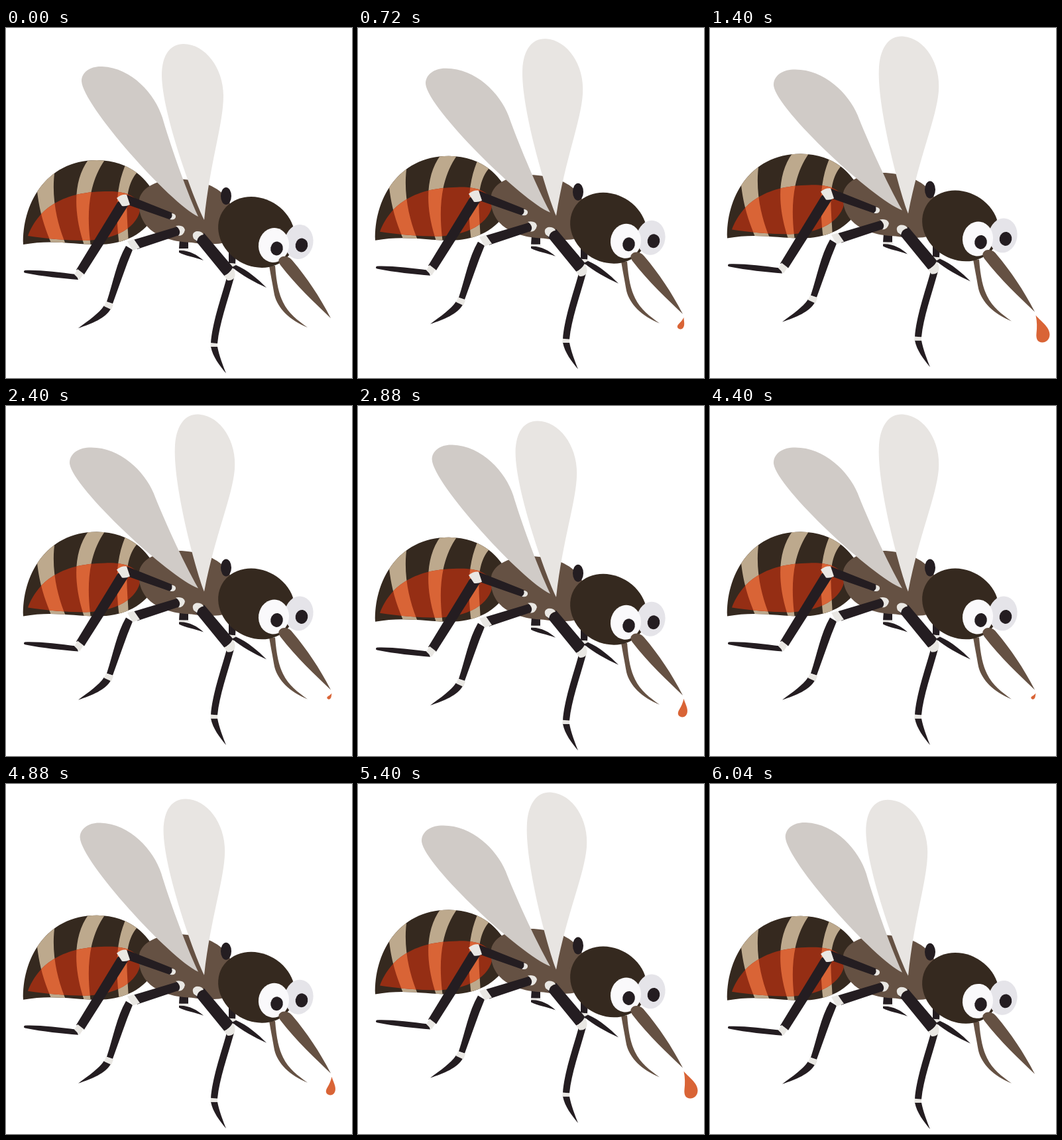
Recreate the animation shown at these times as an HTML page with a canvas. Size 522x527 px, loop 6080 ms.

```html
<!DOCTYPE html>
<html lang="en">
<head>
<meta charset="utf-8">
<title>Mosquito</title>
<style>
html, body { margin: 0; width: 100%; height: 100%; overflow: hidden; background: #fff; }
canvas { display: block; }
</style>
</head>
<body>
<canvas id="stage" width="522" height="527"></canvas>
<script>
const ctx = document.getElementById('stage').getContext('2d');
const LOOP = 6080, STEP = 40, BOB = 1000, DRIP = 2000;
const INK = '#241d21', JOINT = '#e9e7e3', BROWN = '#655143', DARK = '#35291f';
const TAN = '#bda98d', BLOOD = '#952e14', ORANGE = '#d96436';

const shape = d => new Path2D(d + 'Z');
const parts = list => list.map(([color, d]) => [color, shape(d)]);

const belly = shape('M26 326C24 268 58 199 137 199C190 199 215 232 224 250L222 285C205 315 170 326 140 326C100 326 70 318 26 326');
const blood = shape('M33 313C48 275 80 247 150 246C175 245 198 250 203 270C200 300 165 319 120 320C90 320 60 317 33 313');
const stripes = shape('M46 235C49 275 59 303 70 328L91 328C75 290 68 250 74 212');
stripes.addPath(shape('M126 196C103 225 99 272 119 330L128 330C122 285 122 235 151 196'));
stripes.addPath(shape('M183 200C167 233 164 270 171 328L185 328C184 285 174 240 201 214'));
const thorax = shape('M201 258C205 238 235 225 270 228C307 231 329 246 338 264L340 320C325 327 300 326 280 323C240 322 196 305 201 258');
const frontWing = shape('M299 289C282 255 236 130 235 72C235 40 248 24 268 24C300 24 328 60 328 102C328 145 308 200 299 289');
const backWing = shape('M290 284C248 264 116 117 114 80C114 66 128 57 145 58C190 60 225 100 236 135C246 170 270 240 290 284');
const drop = shape('M0 0C6 8 21 17 21 29C21 37 15 41 10 41C3 41 0 36 1 27C2 18 2 10 0 0');
const palp = shape('M397 358L406 358C408 385 412 401 418 413C426 430 440 440 455 451C428 440 410 422 405 402C402 385 400 375 397 358');
const proboscis = shape('M412 348C416 341 427 343 432 350C454 376 473 404 490 437C467 415 438 388 414 357C411 352 411 350 412 348');

const hindLegs = parts([
  [INK, 'M262 318L275 322L275 332L261 332'],
  [JOINT, 'M261 332L276 333L277 335L261 335'],
  [INK, 'M261 335C275 334 288 341 298 350C285 345 270 343 261 338'],
  [INK, 'M336 318L347 338L346 355L336 354'],
  [JOINT, 'M336 354L348 355L346 360L336 357'],
  [INK, 'M347 357C365 365 380 378 393 391C375 383 355 372 341 360']
]);
const legs = parts([
  [INK, 'M182 251L250 278Q256 284 249 289L186 267'],
  [JOINT, 'M250 279Q257 280 256 285Q254 290 247 288Q252 285 250 279'],
  [INK, 'M169 261L185 266L118 371L106 364'],
  [JOINT, 'M167 256Q174 250 182 251L187 266Q181 269 175 268'],
  [INK, 'M106 371C80 368 50 364 28 365Q25 368 30 369C55 374 85 377 109 379'],
  [JOINT, 'M103 371L108 363L117 370L111 379'],

  [INK, 'M192 319L259 299L264 311L198 333'],
  [JOINT, 'M256 298Q268 296 270 304Q268 313 260 313Q266 305 256 298'],
  [INK, 'M181 328L191 334C180 360 171 388 161 415L152 412C162 382 167 352 181 328'],
  [JOINT, 'M183 321L193 318L202 331L191 335'],
  [INK, 'M148 418L158 423C150 437 130 445 109 452C125 440 140 430 148 418'],
  [JOINT, 'M151 412L162 416L159 424L148 419'],

  [INK, 'M285 319L299 309L344 362L330 374'],
  [JOINT, 'M283 317Q279 308 288 306Q296 306 298 311Q290 312 288 321'],
  [INK, 'M333 376L344 376C334 412 322 445 319 475L309 475C311 445 324 408 333 376'],
  [JOINT, 'M329 373Q337 370 342 361Q347 368 345 375Q342 381 334 380'],
  [INK, 'M309 480L319 480C322 495 327 507 332 520C322 508 312 495 309 480'],
  [JOINT, 'M309 474L319 475L319 480L308 480']
]);

function fill(color, path) {
  ctx.fillStyle = color;
  ctx.fill(path);
}

function oval(color, x, y, rx, ry, deg = 0) {
  ctx.fillStyle = color;
  ctx.beginPath();
  ctx.ellipse(x, y, rx, ry, deg * Math.PI / 180, 0, Math.PI * 2);
  ctx.fill();
}

function turned(path, color, x, y, deg) {
  ctx.save();
  ctx.translate(x, y);
  ctx.rotate(deg * Math.PI / 180);
  ctx.translate(-x, -y);
  fill(color, path);
  ctx.restore();
}

// cubic-bezier(.42, 0, .58, 1)
function ease(x) {
  if (x <= 0) return 0;
  if (x >= 1) return 1;
  let lo = 0, hi = 1, s;
  for (let i = 0; i < 20; i++) {
    s = (lo + hi) / 2;
    const bx = 1.26 * (1 - s) ** 2 * s + 1.74 * (1 - s) * s * s + s ** 3;
    if (bx < x) lo = s; else hi = s;
  }
  return s * s * (3 - 2 * s);
}

function drawAbdomen() {
  fill(DARK, belly);
  ctx.save();
  ctx.clip(belly);
  fill(TAN, stripes);
  fill(BLOOD, blood);
  ctx.clip(blood);
  fill(ORANGE, stripes);
  ctx.restore();
}

function drawDrop(p) {
  if (p < 300 || p > 1800) return;
  const grow = p < 1450 ? ease((p - 400) / 920) : 1 - ease((p - 1450) / 300);
  const edge = Math.min(1, (p - 300) / 100, (1800 - p) / 50);
  const size = (0.25 + 0.75 * grow) * edge;
  ctx.save();
  ctx.translate(491.5, 442);
  ctx.rotate((1 - grow) * 53 * Math.PI / 180);
  ctx.scale(size, size);
  fill(ORANGE, drop);
  ctx.restore();
}

function draw(t) {
  const phase = t % BOB / BOB;
  const lift = ease(1 - Math.abs(2 * phase - 1));
  ctx.fillStyle = '#fff';
  ctx.fillRect(0, 0, 522, 527);
  ctx.save();
  ctx.translate(0, -10.4 * lift);

  drawAbdomen();
  for (const [color, path] of hindLegs) fill(color, path);
  fill(BROWN, thorax);
  oval(INK, 332, 253, 8, 13);
  turned(backWing, '#d0cbc7', 290, 284, -5.7 * lift);
  turned(frontWing, '#e8e5e2', 299, 289, 5.7 * lift);
  for (const [color, path] of legs) fill(color, path);

  fill(BROWN, palp);
  oval(DARK, 378, 307.5, 60, 51, 30);
  oval('#e5e4e9', 442, 322, 21.5, 26, 8);
  oval(INK, 446, 327, 9.3, 10.5, 10);
  oval('#faf9fb', 404, 327, 23, 26, 8);
  oval(INK, 408.5, 332, 9.3, 10.5, 10);
  fill(BROWN, proboscis);
  drawDrop(t % DRIP);
  ctx.restore();
}

const start = performance.now();
function tick() {
  const t = (performance.now() - start) % LOOP;
  draw(Math.floor(t / STEP) * STEP);
  requestAnimationFrame(tick);
}
tick();
</script>
</body>
</html>
```
